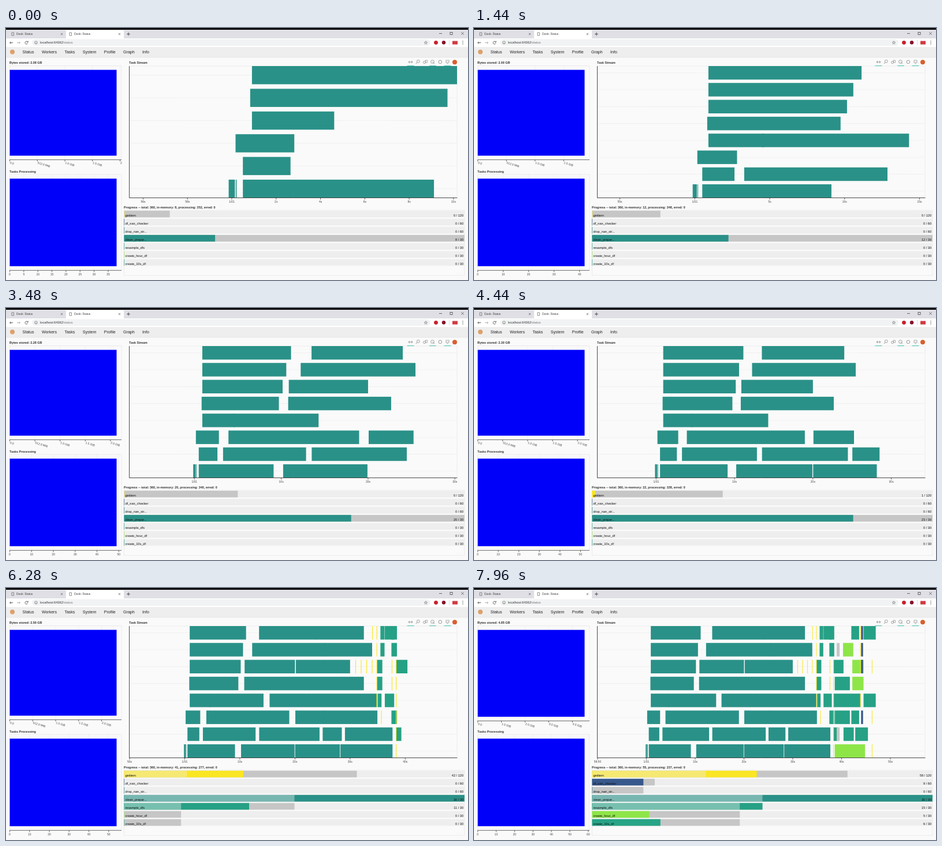
An HTML page with a canvas that plays this animation: 800 px wide and 437 px high, repeating every 8000 ms.

```html
<!DOCTYPE html>
<html lang="en">
<head>
<meta charset="utf-8">
<title>Dask: Status</title>
<style>
html, body { margin: 0; width: 100%; height: 100%; overflow: hidden; background: #fafafa; }
canvas { display: block; }
</style>
</head>
<body>
<canvas id="stage" width="800" height="437"></canvas>
<script>
const ctx = document.getElementById('stage').getContext('2d');
const LOOP = 8000;
const COLOR = {
  clean: '#2a9188', getitem: '#fae622', resample: '#26a185', hour: '#8ee548',
  tens: '#27a486', check: '#37588c', drop: '#2b7f8e', transfer: '#c6c6c6'
};

// Piecewise linear curve through [x, y] points.
function track(x, ...points) {
  const i = points.findIndex(p => x <= p[0]);
  if (i < 0) return points[points.length - 1][1];
  if (i === 0) return points[0][1];
  const [[x0, y0], [x1, y1]] = [points[i - 1], points[i]];
  return y0 + (y1 - y0) * (x - x0) / (x1 - x0);
}

// Seconds of computation reached at each moment; the progress panel runs on its own refresh.
const opening = [[0, 10.2], [480, 10.2], [680, 11.15], [2280, 20.02], [2480, 20.02], [3680, 28.55], [4439, 28.6]];
const closing = [[5840, 39.5], [6270, 39.5], [6280, 40.5], [7960, 47.3]];
const streamTime = t => track(t, ...opening, [5150, 35.2], [5160, 35.8], ...closing);
const progressTime = t => track(t, ...opening, [4440, 31], [5160, 34.9], ...closing);

const tasks = [];
// Transfers are reported together with the task that follows them.
function add(kind, lane, start, end) {
  tasks.push({ kind, lane: +lane, start, end, seen: end + (kind === 'transfer' ? 3 : 0) });
}
// Back-to-back cleaning tasks: workers pause early on, later they hardly do.
function clean(lane, start, ends, pause = 0, latePause = -0.1) {
  for (const end of ends) {
    add('clean', lane, start, end);
    start = end + (end < 19.5 ? pause : latePause);
  }
}
function batch(kind, lanes, start, end = start + 0.12) {
  for (const lane of lanes) add(kind, lane, start, end);
}

clean(0, -0.14, [0.14]);
clean(0, 0.18, [0.22]);
clean(0, 0.5, [9.12, 19.93, 28.15, 37.7], 1.1, 0.1);
clean(1, 0.5, [2.65, 12.86, 24.46, 28.5, 37.7], 0.65, 0.57);
clean(2, 0.17, [2.82, 18.97, 25.24, 34.95], 1.1);
clean(3, 0.91, [4.62]);
clean(3, 4.5, [14.3, 34.85], 1.1);
clean(4, 0.83, [9.73, 22.66, 32.5], 1.07);
clean(5, 0.91, [10.16, 20, 30], 0.71, 0.16);
clean(6, 0.91, [10.58, 25.46, 34], 1.66);
clean(7, 0.91, [11.13, 24, 32.5], 2.36);

batch('resample', '3', 35, 35.7);
batch('resample', '45', 34.85, 35.85);
batch('resample', '67', 35.5, 36.25);
batch('resample', '37', 36.3, 38);
batch('resample', '267', 37.5, 38.5);
batch('resample', '1', 38.3, 39.3);
batch('resample', '5', 38.4, 40.4);
batch('resample', '24', 38.6, 41.7);
batch('resample', '3', 38.3, 43.9);
batch('resample', '1', 40.4, 42.5);
batch('resample', '1', 42.8, 45.4);
batch('resample', '27', 42, 43.6);
batch('resample', '37', 44.5, 47);
batch('hour', '0', 38.6, 44.8);
batch('hour', '6', 40.3, 42.4);
batch('hour', '45', 42.2, 44.5);
batch('check', '2567', 44, 44.4);
batch('transfer', '16', 39, 39.6);
for (let i = 0; i < 4; i++) batch('getitem', '5', 30.95 + i);
batch('getitem', '7', 34);
batch('getitem', '34567', 34.8);
batch('getitem', '2', 35.62);
batch('getitem', '45', 37.55);
batch('getitem', '012345', 38.3);
batch('getitem', '3567', 43.8);
batch('getitem', '025', 46.2);

function rect(color, x, y, w, h) {
  ctx.fillStyle = color;
  ctx.fillRect(x, y, w, h);
}
function outline(color, x, y, w, h) {
  ctx.strokeStyle = color;
  ctx.lineWidth = 0.7;
  ctx.strokeRect(x, y, w, h);
}
function line(color, width, ...points) {
  ctx.strokeStyle = color;
  ctx.lineWidth = width;
  ctx.beginPath();
  for (let i = 0; i < points.length; i += 2) ctx.lineTo(points[i], points[i + 1]);
  ctx.stroke();
}
function circle(color, x, y, r, width) {
  ctx.beginPath();
  ctx.arc(x, y, r, 0, 7);
  ctx.fillStyle = ctx.strokeStyle = color;
  if (width) { ctx.lineWidth = width; ctx.stroke(); } else ctx.fill();
}
function cross(x, y, r) {
  line('#444', 0.7, x - r, y - r, x + r, y + r);
  line('#444', 0.7, x - r, y + r, x + r, y - r);
}
function arrow(color, tail, tip, y) {
  const back = tip + Math.sign(tail - tip) * 2;
  line(color, 0.9, tail, y, tip, y);
  line(color, 0.9, back, y - 2, tip, y, back, y + 2);
}
function text(str, x, y, size, color = '#222', align = 'left', weight = '') {
  ctx.font = `${weight} ${size}px "Liberation Sans", sans-serif`;
  ctx.textAlign = align;
  ctx.fillStyle = color;
  ctx.fillText(str, x, y);
}
const title = (str, x, y) => text(str, x, y, 5.45, '#333', 'left', 'bold');

function drawBrowser() {
  rect('#dfdfe5', 0, 3, 800, 15);
  rect('#000', 0, 0, 800, 3);
  rect('#fff', 104, 4, 100, 14);
  rect('#fff', 0, 18, 800, 15);
  for (const x of [0, 100]) {
    outline('#666', x + 10, 8, 3.6, 5);
    text('Dask: Status', x + 18, 12.3, 5, '#444');
    cross(x + 96.5, 10.5, 1.6);
  }
  line('#444', 0.9, 209, 10.5, 215, 10.5);
  line('#444', 0.9, 212, 7.5, 212, 13.5);
  line('#333', 0.7, 750, 9.5, 755, 9.5);
  outline('#333', 769, 7.5, 4, 4);
  cross(790.5, 9.5, 2.2);

  ctx.fillStyle = '#f1f3f4';
  ctx.beginPath();
  ctx.roundRect(45, 19.5, 690, 11.5, 5.7);
  ctx.fill();
  arrow('#555', 12, 6.5, 25.5);
  arrow('#aaa', 19, 24.5, 25.5);
  ctx.strokeStyle = '#555';
  ctx.beginPath();
  ctx.arc(35.5, 25.5, 2.5, 0.4, 5.6);
  ctx.stroke();
  line('#555', 0.9, 38.2, 22.5, 38.2, 24.6, 36, 24.6);
  circle('#666', 52, 25.3, 2.4, 0.7);
  line('#666', 0.7, 52, 25, 52, 26.8);
  text('localhost:64362', 59, 27.3, 5.7, '#333');
  text('/status', 59 + ctx.measureText('localhost:64362').width, 27.3, 5.7, '#777');
  const star = [];
  for (let i = 0; i <= 10; i++) {
    const r = i % 2 ? 1.2 : 2.9, a = i * Math.PI / 5;
    star.push(727 + r * Math.sin(a), 25.5 - r * Math.cos(a));
  }
  line('#666', 0.6, ...star);
  circle('#c8202f', 744.5, 25.3, 3.4);
  circle('#84142b', 758, 25.3, 3.2);
  line('#ccc', 0.7, 767.5, 21, 767.5, 30);
  rect('#cf3b43', 773, 22.5, 9, 6);
  for (const y of [22.8, 25.3, 27.8]) circle('#555', 791, y, 0.7);

  rect('#eeeeee', 0, 33, 800, 18);
  line('#ddd', 0.6, 0, 51, 800, 51);
  circle('#dda06a', 11, 41.5, 4);
  let x = 28.5;
  for (const name of ['Status', 'Workers', 'Tasks', 'System', 'Profile', 'Graph', 'Info']) {
    text(name, x, 44, 7.05);
    x += ctx.measureText(name).width + 13.4;
  }
}

// Single wide bar whose axis scales so that the bar always ends at the same place.
function drawGauge(top, axis, value, step, label, angle) {
  const scale = 185 / value, pad = (axis - top) * 0.0434;
  outline('#e6e6e6', 6.5, top, 193.5, axis - top);
  for (let v = 0; v * scale <= 194; v += step) {
    const x = 6.5 + v * scale;
    line('#e9e9e9', 0.6, x, top, x, axis);
    line('#333', 0.7, x, axis, x, axis + 3);
    ctx.save();
    ctx.beginPath();
    ctx.rect(0, axis, 202, 20);
    ctx.clip();
    ctx.translate(x, axis + (angle ? 6.5 : 8.5));
    ctx.rotate(angle);
    text(label(v), 0, 0, 5, '#444', angle ? 'left' : 'center');
    ctx.restore();
  }
  rect('#0000fa', 6.5, top + pad, 185, axis - top - 2 * pad);
  line('#333', 0.7, 6, axis, 200, axis);
}
function byteLabel(gib) {
  if (!gib) return '0.0';
  return gib < 1 ? (gib * 1024).toFixed(1) + ' MiB' : (Math.round(gib * 10 + 1e-6) / 10).toFixed(1) + ' GiB';
}

function drawGauges(last) {
  const marks = [10.16, 11.13, 20, 28.5, 35.74, 40.4, 47];
  const sample = (...values) => track(last, ...marks.map((mark, i) => [mark, values[i]]));
  const bytes = sample(2.08, 1.87, 2.24, 2.3, 2.23, 2.5, 4.85);
  const busy = Math.round(sample(38, 40, 45, 52, 48, 54, 58));
  const gib = bytes / 1.073742;
  const step = gib < 1.85 ? 0.25 : gib < 3 ? 0.5 : 1;
  title(`Bytes stored: ${bytes.toFixed(2)} GB`, 6, 62.3);
  drawGauge(65.5, step < 1 ? 228.5 : 230.5, gib, step, byteLabel, 0.3);
  title('Tasks Processing', 6, 250.8);
  drawGauge(254, 420.3, busy, busy < 39 ? 5 : 10, String, 0);
}

function drawTools() {
  const c = '#8a8a8a';
  arrow(c, 700, 697, 59);
  arrow(c, 700, 704, 59);
  circle(c, 713.8, 57.8, 2.4, 0.8);
  line(c, 0.9, 712, 59.6, 709.8, 62);
  circle(c, 724.5, 59.5, 2, 0.8);
  outline(c, 726.3, 56, 3, 4);
  circle(c, 738.5, 58.5, 2.9, 0.8);
  line(c, 0.8, 738.5, 58.5, 742, 62);
  circle(c, 751.8, 58.8, 2.8, 0.9);
  outline(c, 762, 56, 5, 3.8);
  line(c, 0.7, 763, 61.8, 766, 61.8);
  circle('#d8602f', 777, 59.2, 4);
  for (const x of [694.5, 733, 758.5]) rect('#4dbfb0', x, 65, 12, 1);
}

function drawStream(shown, last) {
  const lanes = Math.max(...shown.map(task => task.lane)) + 1;
  const left = -Math.min(last * 0.455, last < 30 ? 7.5 : 10.05);
  const right = last + track(last, [11.1, 0], [28.5, 5.8], [35.74, 10], [40.4, 9], [47, 10.1]);
  const scale = 567.5 / (right - left);
  const toX = s => 213.5 + (s - left) * scale;
  const unit = 228.5 / (lanes - 0.2);

  title('Task Stream', 213, 62.3);
  outline('#e6e6e6', 213.5, 66, 567.5, 228.5);
  drawTools();
  ctx.save();
  ctx.beginPath();
  ctx.rect(213.5, 65.5, 568, 229);
  ctx.clip();
  for (let i = 0; i < lanes; i++) {
    const y = 294.5 - (i + 0.4) * unit;
    line('#ececec', 0.7, 213, y, 781, y);
  }
  for (const { kind, lane, start, end } of shown) {
    rect(COLOR[kind], toX(start), 294.5 - (lane + 0.8) * unit, Math.max(1, (end - start) * scale), 0.8 * unit);
  }
  ctx.restore();
  line('#222', 0.8, 213.5, 66, 213.5, 294.5, 781.5, 294.5);

  const span = right - left;
  const step = span < 18 ? 2 : span < 36 ? 5 : 10;
  for (let s = Math.ceil(left / step) * step; s <= right; s += step) {
    const x = toX(s);
    line('#222', 0.7, x, 294.5, x, 297.5);
    const early = right > 55 ? '59:' + (60 + s) : 60 + s + 's';
    text(s === 0 ? '1/01' : s < 0 ? early : s + 's', x, 303, 5, '#444', 'center');
  }
}

function counts(now) {
  const at = (...points) => Math.round(track(now, ...points));
  const upTo = n => at([40.5, 0], [47.3, n]);
  const cleaned = tasks.filter(task => task.kind === 'clean' && task.end <= now).length;
  const getitem = at([30.7, 0], [34.9, 17], [40.5, 42], [47.3, 58]);
  const resample = at([34.9, 0], [40.5, 11], [47.3, 15]);
  const cleanFreed = at([33.5, 0], [34.9, 8], [40.5, 15]);
  const resampleFreed = at([37, 0], [40.5, 5], [47.3, 13]);
  const hour = upTo(5), tens = upTo(6), check = upTo(9);
  // name, kind, total, released, done, started
  return [
    ['getitem', 'getitem', 120, Math.min(getitem, 2 * (resample + hour)), getitem, 2 * (cleaned + resample)],
    ['df_nan_checker', 'check', 60, 0, check, hour + tens],
    ['drop_nan_str...', 'drop', 60, 0, 0, check],
    ['clean_prepar...', 'clean', 30, cleanFreed, cleaned, 30],
    ['resample_dfs', 'resample', 30, resampleFreed, resample, cleanFreed],
    ['create_hour_df', 'hour', 30, 0, hour, resampleFreed],
    ['create_10s_df', 'tens', 30, 0, tens, resampleFreed]
  ];
}

function drawProgress(now, titleNow) {
  let released = 0, done = 0;
  for (const row of counts(titleNow)) {
    released += row[3];
    done += row[4];
  }
  title(`Progress -- total: 360, in-memory: ${done - released}, processing: ${360 - done}, erred: 0`, 204, 313.3);
  outline('#e4e4e4', 204.5, 316, 589.5, 113);
  counts(now).forEach(([name, kind, total, freed, finished, started], i) => {
    const y = 316.8 + 14 * i, px = 589 / total;
    rect('#eeeeee', 205, y, 589, 11.6);
    rect('#c6c6c6', 205, y, started * px, 11.6);
    rect(COLOR[kind], 204.3, y, finished * px + 0.7, 11.6);
    rect('rgba(238,238,238,.4)', 205, y, freed * px, 11.6);
    text(name, 206.5, y + 9.9, 5.6, '#111');
    text(`${finished} / ${total}`, 792, y + 9.9, 5.6, '#111', 'right');
  });
}

function draw(t) {
  const now = streamTime(t), progress = progressTime(t);
  const shown = tasks.filter(task => task.seen <= now);
  const last = Math.max(...shown.map(task => task.end));
  rect('#fafafa', 0, 0, 800, 437);
  drawBrowser();
  drawGauges(last);
  drawStream(shown, last);
  drawProgress(progress, Math.min(now, progress));
}

function frame() {
  draw(performance.now() % LOOP);
  requestAnimationFrame(frame);
}
frame();
</script>
</body>
</html>
```
